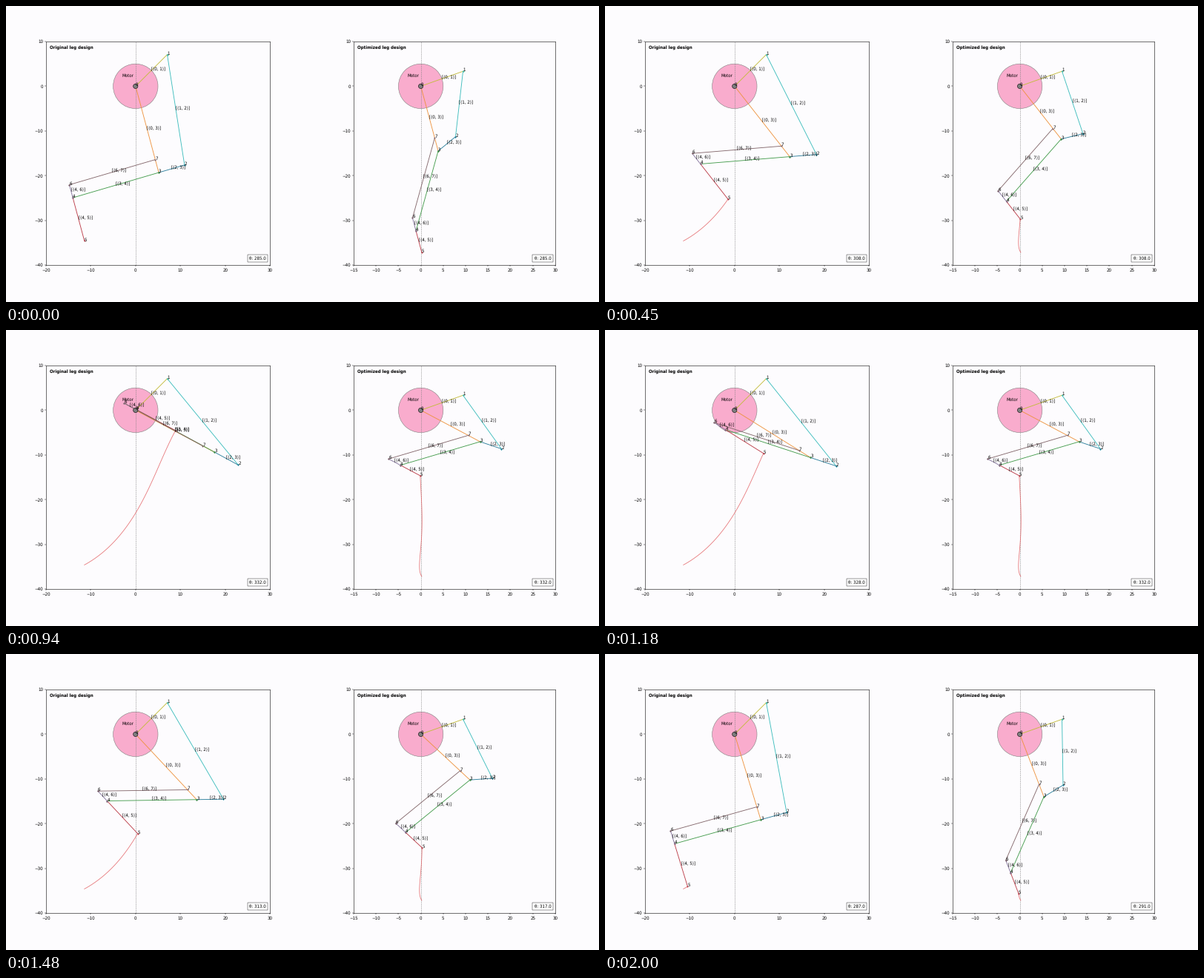
These frames come from a looping animation (800 by 400 pixels, 2030 ms). A matplotlib script:

```python
import numpy as np
import matplotlib.pyplot as plt
from matplotlib.animation import FuncAnimation
from matplotlib.patches import Circle

W, H = 800, 400
UNIT = 6.04          # pixels per data unit
START = 285          # lowest crank angle, degrees
FRAMES, INTERVAL = 203, 10
POSES = 67           # distinct poses shown per loop
PAPER = "#fdfcfe"

LINKS = {
    (0, 1): "#c4bc3c", (1, 2): "#3dbdbd", (0, 3): "#ee9440",
    (2, 3): "#2c7f9c", (3, 4): "#449c4c", (4, 5): "#bc3c48",
    (4, 6): "#84749c", (6, 7): "#84686c",
}


def polar(r, deg):
    a = np.radians(deg)
    return r * np.array([np.cos(a), np.sin(a)])


class Leg:
    """A motor-driven linkage drawn in its own axes."""

    def __init__(self, fig, title, left, xmin, xstep, peak, base,
                 crank, rod, rocker, thigh, shin, bend=0, heel=3):
        self.peak, self.base = peak, base
        self.crank, self.rod, self.rocker = crank, rod, rocker
        self.thigh, self.shin = thigh, shin
        self.bend, self.heel = bend, heel
        self.path = np.array([self.joints(a)[5]
                              for a in range(START, peak + 1)])
        self.build(fig, title, left, xmin, xstep)

    def joints(self, angle):
        p0 = np.zeros(2)
        p1 = polar(10, self.base)
        p3 = polar(self.crank, angle)
        p7 = polar(self.crank - self.heel, angle)
        dx, dy = p1 - p3
        d = np.hypot(dx, dy)
        c = (self.rocker**2 + d**2 - self.rod**2) / (2 * self.rocker * d)
        phi = np.degrees(np.arctan2(dy, dx) - np.arccos(np.clip(c, -1, 1)))
        p2 = p3 + polar(self.rocker, phi)
        p4 = p3 - polar(self.thigh, phi + self.bend)
        p5 = p4 + polar(self.shin, angle)
        p6 = p4 + p7 - p3
        return [p0, p1, p2, p3, p4, p5, p6, p7]

    def build(self, fig, title, left, xmin, xstep):
        width = (30 - xmin) * UNIT
        ax = fig.add_axes([left / W, 50 / H, width / W, 50 * UNIT / H])
        ax.set(xlim=(xmin, 30), ylim=(-40, 10), facecolor=PAPER,
               xticks=range(xmin, 31, xstep), yticks=range(-40, 11, 10))
        for spine in ax.spines.values():
            spine.set_linewidth(1)

        ax.add_patch(Circle((0, 0), 5, fc="#f9accd", ec="gray", lw=1))
        ax.axvline(0, color="gray", ls="--", lw=0.9)
        ax.add_patch(Circle((0, 0), 0.52, fc="gray", ec="black",
                            lw=1, zorder=2.5))
        ax.text(-3, 2, "Motor")
        ax.text(xmin + 0.9, 8.35, title, weight="bold")

        self.trail, = ax.plot([], [], color="#e04c50", alpha=0.75, lw=1.5)
        self.bars, self.tags = {}, {}
        for link, color in LINKS.items():
            self.bars[link], = ax.plot([], [], color=color, lw=1.6,
                                       marker=".", ms=5)
            self.tags[link] = ax.text(0, 0, f"[{link}]")
        self.names = [ax.text(0, 0, str(i)) for i in range(8)]
        self.readout = ax.text(29.1, -39.05, "", ha="right", va="bottom",
                               bbox=dict(fc="white", ec="black", lw=0.7))

    def pose(self, tick):
        angle = self.peak - abs(self.peak - START - tick)
        pts = self.joints(angle)
        for (i, j), bar in self.bars.items():
            bar.set_data(*zip(pts[i], pts[j]))
            self.tags[i, j].set_position((pts[i] + pts[j]) / 2)
        for name, p in zip(self.names, pts):
            name.set_position(p)
        self.trail.set_data(*self.path[:angle - START + 1].T)
        self.readout.set_text(f"θ: {angle:.1f}")


plt.rcParams.update({"font.family": "DejaVu Sans", "font.size": 10,
                     "text.hinting": "none"})
fig = plt.figure(figsize=(20, 10), dpi=40, facecolor=PAPER)

legs = [
    Leg(fig, "Original leg design", 54, -20, 10, peak=336, base=45,
        crank=20, rod=25, rocker=6, thigh=20, shin=10),
    Leg(fig, "Optimized leg design", 469, -15, 5, peak=338, base=19.5,
        crank=15, rod=14.73, rocker=5.02, thigh=18.55, shin=5, bend=35),
]


def update(k):
    # Hold each pose for about 30 ms; the crank turns one degree per 20 ms.
    step = int((k + 0.5) * POSES / FRAMES)
    tick = int(round(step * FRAMES / POSES) / 2 + 0.5)
    for leg in legs:
        leg.pose(tick)
    return []


anim = FuncAnimation(fig, update, frames=FRAMES, interval=INTERVAL,
                     repeat=True, repeat_delay=0, blit=False)
plt.show()
```
